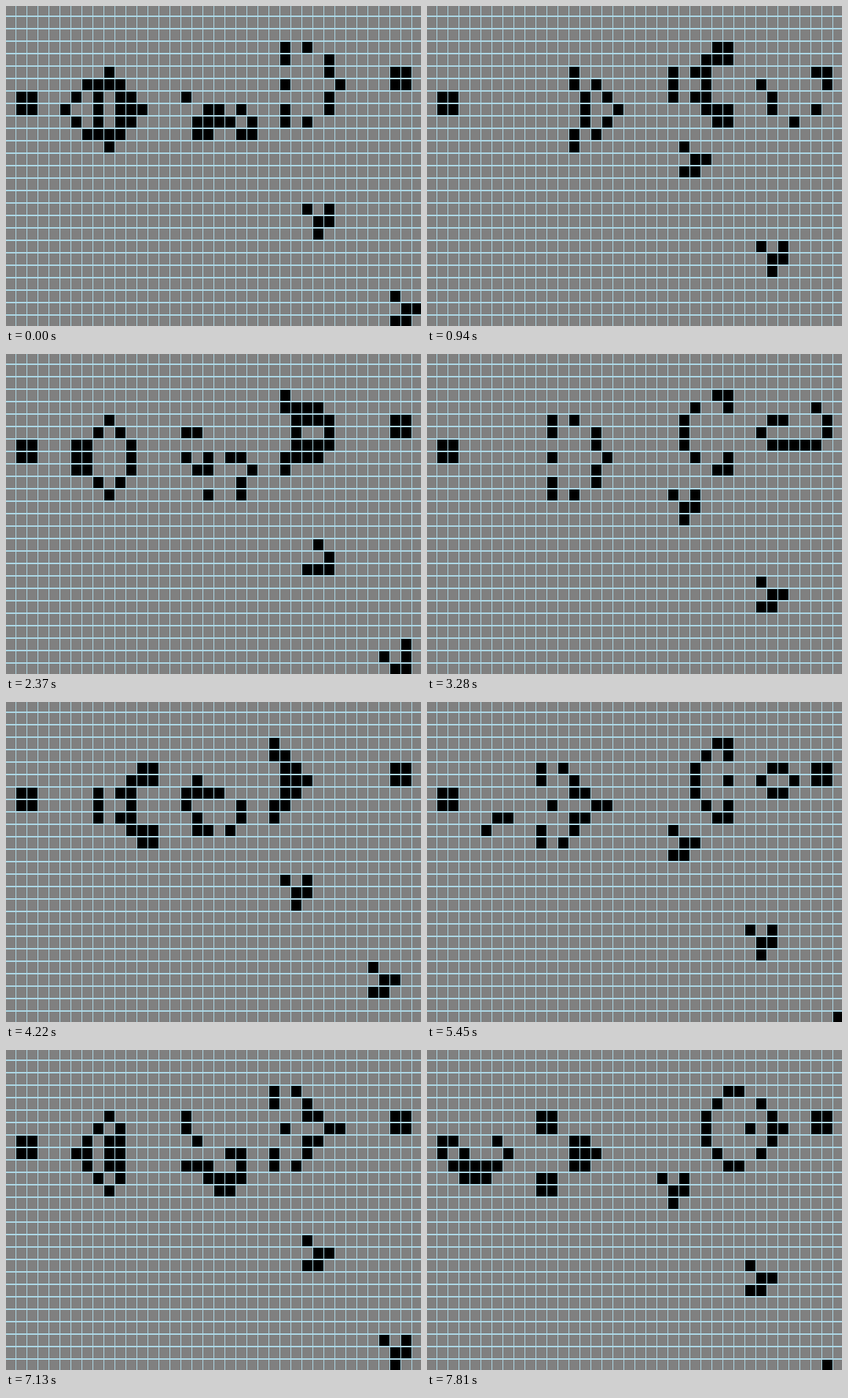
Write an HTML page with a canvas that moves like this. It is 566 px wide and 437 px high and loops after 8 s.

```html
<!DOCTYPE html>
<html lang="en">
<head>
<meta charset="utf-8">
<title>Glider gun</title>
<style>
  html, body { margin: 0; width: 100%; height: 100%; overflow: hidden; background: #808080; }
  canvas { display: block; }
</style>
</head>
<body>
<canvas id="stage" width="566" height="437"></canvas>
<script>
const GUN = '24bo$22bobo$12b2o6b2o12b2o$11bo3bo4b2o12b2o$2o8bo5bo3b2o$' +
            '2o8bo3bob2o4bobo$10bo5bo7bo$11bo3bo$12b2o!';
const GUN_COL = 1, GUN_ROW = 3;
const WARM_UP = 104, GENERATIONS = 97;

// The screen refreshes in ticks that are a little shorter than a generation.
const LOOP = 8000, TICK = 66.4, GENERATIONS_PER_TICK = 0.825, PHASE = 0.48;

// The board is larger than the stage so that gliders can leave it.
const COLS = 90, ROWS = 80;
const WIDTH = 566, HEIGHT = 437;
const CELL_W = 14, CELL_H = 15, PITCH_X = 15, PITCH_Y = 17;
const VIEW_COLS = Math.ceil(WIDTH / PITCH_X), VIEW_ROWS = Math.ceil(HEIGHT / PITCH_Y);

function parseRle(rle, col0, row0) {
  const board = new Uint8Array(COLS * ROWS);
  let col = col0, row = row0;
  for (const [, count, tag] of rle.matchAll(/(\d*)([bo$])/g)) {
    const n = Number(count || 1);
    if (tag === '$') { row += n; col = col0; continue; }
    if (tag === 'o') board.fill(1, row * COLS + col, row * COLS + col + n);
    col += n;
  }
  return board;
}

function countNeighbours(board, i) {
  let sum = -board[i];
  for (let dy = -COLS; dy <= COLS; dy += COLS) {
    for (let dx = -1; dx <= 1; dx++) sum += board[i + dy + dx];
  }
  return sum;
}

function evolve(board) {
  const next = new Uint8Array(board.length);
  for (let row = 1; row < ROWS - 1; row++) {
    for (let col = 1; col < COLS - 1; col++) {
      const i = row * COLS + col, near = countNeighbours(board, i);
      next[i] = near === 3 || (near === 2 && board[i]) ? 1 : 0;
    }
  }
  return next;
}

let board = parseRle(GUN, GUN_COL, GUN_ROW);
for (let i = 0; i < WARM_UP; i++) board = evolve(board);
const generations = [board];
while (generations.length < GENERATIONS) generations.push(board = evolve(board));

function generationAt(time) {
  const tick = Math.floor(time / TICK);
  return Math.min(GENERATIONS - 1, Math.floor(tick * GENERATIONS_PER_TICK + PHASE));
}

const ctx = document.getElementById('stage').getContext('2d');

function draw(cells) {
  ctx.fillStyle = '#808080';
  ctx.fillRect(0, 0, WIDTH, HEIGHT);
  ctx.fillStyle = '#add8e6';
  for (let col = 0; col < VIEW_COLS; col++) ctx.fillRect(col * PITCH_X + 13, 0, 1, HEIGHT);
  for (let row = 0; row < VIEW_ROWS; row++) ctx.fillRect(0, row * PITCH_Y + 13, WIDTH, 2);
  ctx.fillStyle = '#000';
  for (let row = 0; row < VIEW_ROWS; row++) {
    for (let col = 0; col < VIEW_COLS; col++) {
      if (cells[row * COLS + col]) {
        ctx.fillRect(col * PITCH_X - 1, row * PITCH_Y - 2, CELL_W, CELL_H);
      }
    }
  }
}

const origin = performance.now();
let shown = -1;
function frame() {
  const generation = generationAt((performance.now() - origin) % LOOP);
  if (generation !== shown) draw(generations[shown = generation]);
  requestAnimationFrame(frame);
}
frame();
</script>
</body>
</html>
```
